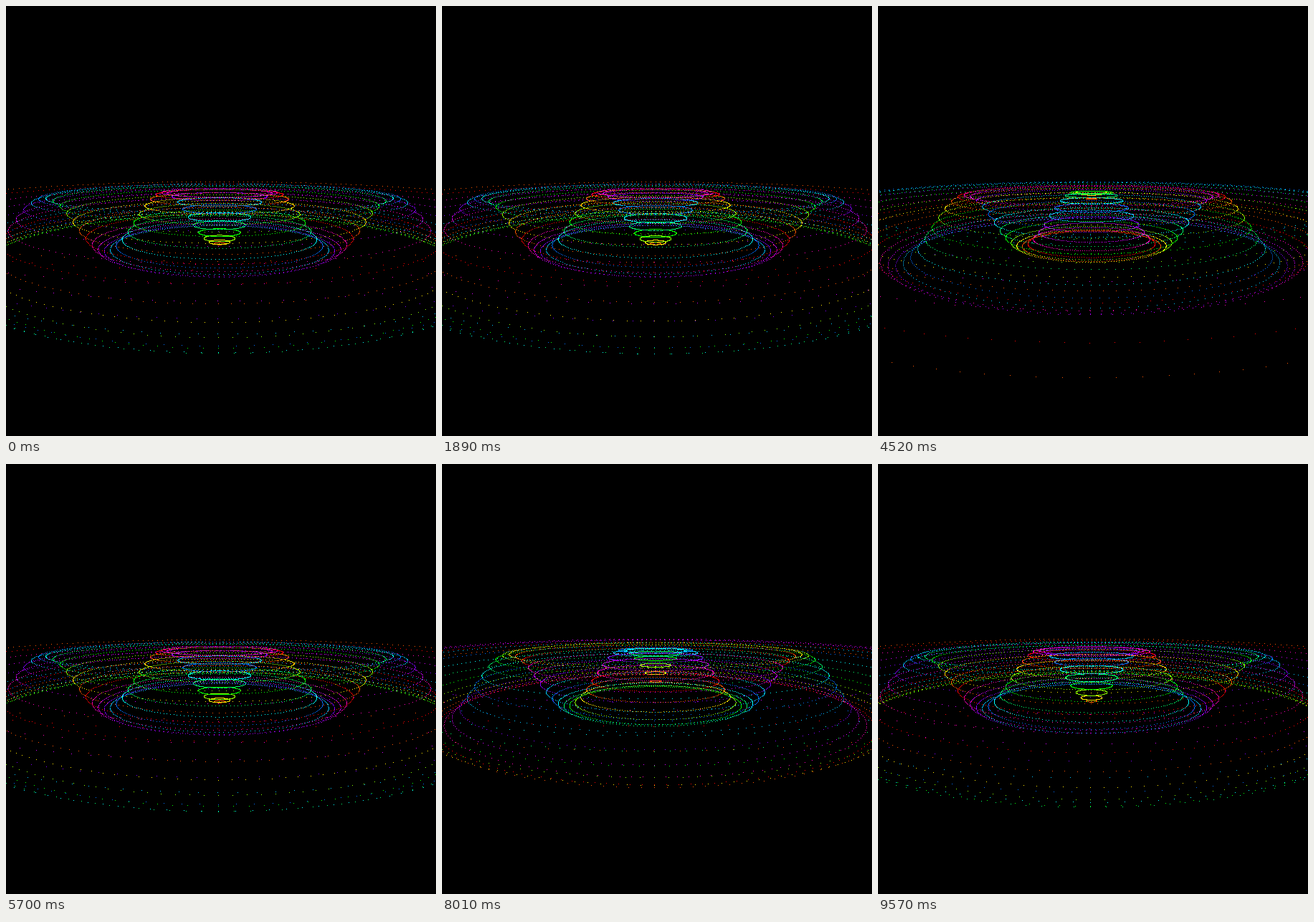
An HTML page with a canvas that plays this animation: 600x600 px, repeating every 9.6 s.

```html
<!DOCTYPE html>
<html lang="en">
<head>
<meta charset="utf-8">
<title>Ring wave</title>
<style>
  html, body { margin: 0; width: 100%; height: 100%; overflow: hidden; background: #000; }
  canvas { display: block; }
</style>
</head>
<body>
<canvas id="stage" width="600" height="600"></canvas>
<script>
const ctx = document.getElementById('stage').getContext('2d');

const LOOP = 9600;
const PERIOD = 1901;      // ms per wave cycle
const CREST = 1063;       // ms at which the outermost ring is lowest
const RINGS = 50;
const PHASE_STEP = 0.3193; // wave phase between neighbouring rings
const ANGLE_STEP = 0.0314;
const DOTS = 201;

// Distances are measured in ring spacings.
const CAMERA = 70;
const SPACING = 7.3;
const CENTER_X = 298;
const HORIZON = 221.5;
const DEPTH = 74;
const SWING = 36;

const HUES = [0, 20, 54, 88, 120, 145, 180, 214, 194, 270, 290, 316];

const circle = Array.from({ length: DOTS }, (_, i) => ({
  x: Math.cos(i * ANGLE_STEP),
  z: Math.sin(i * ANGLE_STEP)
}));

function drawRing(n, time) {
  const phase = 2 * Math.PI * (time - CREST) / PERIOD + (n - RINGS + 1) * PHASE_STEP;
  const height = DEPTH + SWING * Math.cos(phase);
  ctx.fillStyle = `hsl(${HUES[n % HUES.length]}, 100%, 50%)`;
  for (const p of circle) {
    const scale = CAMERA / (CAMERA + n * p.z);
    const x = CENTER_X + SPACING * n * p.x * scale;
    const y = HORIZON + height * scale;
    ctx.fillRect(Math.floor(x), Math.floor(y), 1, 1);
  }
}

function draw(time) {
  ctx.fillStyle = '#000';
  ctx.fillRect(0, 0, 600, 600);
  for (let n = 0; n < RINGS; n++) drawRing(n, time);
}

const start = performance.now();

function tick() {
  draw((performance.now() - start) % LOOP);
  requestAnimationFrame(tick);
}

tick();
</script>
</body>
</html>
```
